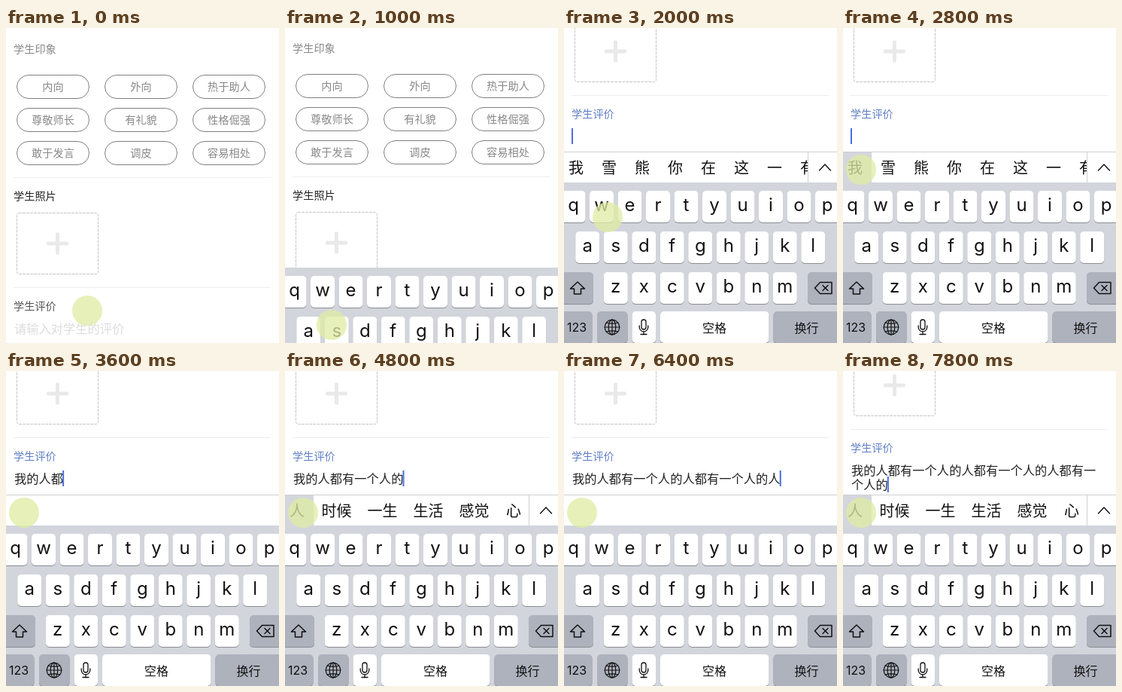
These frames come from a looping animation (363x418 px, 8000 ms). An HTML page with a canvas:

```html
<!DOCTYPE html>
<html lang="zh-CN">
<head>
<meta charset="utf-8">
<style>
html, body { margin: 0; width: 100%; height: 100%; overflow: hidden; background: #fff; }
canvas { display: block; width: 363px; height: 418px; }
</style>
</head>
<body>
<canvas id="stage"></canvas>
<script>
const W = 363, H = 418, LOOP = 8000, STEP = 200;
const canvas = document.getElementById('stage');
const ctx = canvas.getContext('2d');
const dpr = window.devicePixelRatio || 1;
canvas.width = W * dpr;
canvas.height = H * dpr;

const CJK = '"Noto Sans CJK SC", "Noto Sans CJK", sans-serif';
const LATIN = 'Inter, Roboto, sans-serif';
const BLUE = '#4a6ee0';

// Typing rhythm: one candidate is picked every TAP ms
const TAP = 2800 / 13, TAP_START = 3600 - 4.15 * TAP;
const PHRASE = '人都有一个人的', PER_LINE = 20, CHAR = 16.28;
const charAt = i => i < 2 ? '我的'[i] : PHRASE[(i - 2) % 7];

const NEXT = {
  '': '雪 熊 你 在 这 一 有',
  '我': '们 是 在 不 也 想 有',
  '的': '时候 一生 生活 感觉 心',
  '人': '是 生 在 们 不 和 有',
  '都': '是 在 不 会 没有 要 很',
  '有': '人 点 什么 时候 没有',
  '一': '次 天 样 直 些 下 种',
  '个': '月 小时 人的 世界 好'
};

const TAGS = ['内向', '外向', '热于助人', '尊敬师长', '有礼貌', '性格倔强', '敢于发言', '调皮', '容易相处'];

// Touch marker path: time, x, y
const TOUCH = [
  [0, 108, 375], [600, 62, 394], [1000, 62, 394], [2000, 58, 251],
  [2200, 54, 263], [2600, 24, 188]
];

const ease = p => { p = Math.min(1, Math.max(0, p)); return p * p * (3 - 2 * p); };
const ramp = (t, a, b) => ease((t - a) / (b - a));

function touchAt(t) {
  let i = 0;
  while (i < TOUCH.length - 2 && t > TOUCH[i + 1][0]) i++;
  const [ta, xa, ya] = TOUCH[i], [tb, xb, yb] = TOUCH[i + 1];
  const p = ramp(t, ta, tb);
  return [xa + (xb - xa) * p, ya + (yb - ya) * p];
}

function rect(x, y, w, h, color) {
  ctx.fillStyle = color;
  ctx.fillRect(x, y, w, h);
}

function box(x, y, w, h, r) {
  ctx.beginPath();
  ctx.roundRect(x, y, w, h, r);
}

// y is the visual middle of the CJK glyphs
function text(s, x, y, size, color, align = 'left') {
  ctx.font = `${size}px ${CJK}`;
  ctx.fillStyle = color;
  ctx.textAlign = align;
  ctx.fillText(s, x, y + size * 0.38);
}

function line(points, width = 1.4, color = '#111', close = false) {
  ctx.beginPath();
  points.forEach(([x, y]) => ctx.lineTo(x, y));
  if (close) ctx.closePath();
  ctx.lineWidth = width;
  ctx.strokeStyle = color;
  ctx.stroke();
}

function drawPage(t, count) {
  const focused = t >= 1000;
  const scroll = Math.round(255 * ramp(t, 985, 1400)) + (count > 0 ? 1 : 0)
    + Math.round(11 * ramp(t, 7230, 7560));
  ctx.save();
  ctx.translate(0, -scroll);

  text('学生印象', 10, 28, 14.2, '#888');
  TAGS.forEach((tag, i) => {
    const x = 14 + i % 3 * 117, y = 62 + Math.floor(i / 3) * 44;
    box(x + .5, y + .5, 96, 31, 15.5);
    ctx.lineWidth = 1;
    ctx.strokeStyle = '#808080';
    ctx.stroke();
    text(tag, x + 48.5, y + 16, 14.2, '#888', 'center');
  });
  rect(10, 198, 342, 1, '#ededed');

  text('学生照片', 10, 223, 14.2, '#222');
  box(14.5, 245.5, 108, 81, 3);
  ctx.setLineDash([3, 2]);
  ctx.lineWidth = 1;
  ctx.strokeStyle = '#c4c4c4';
  ctx.stroke();
  ctx.setLineDash([]);
  ctx.fillStyle = '#e9e9e9';
  box(54, 283.5, 29, 5, 1.5);
  ctx.fill();
  box(66, 271.5, 5, 29, 1.5);
  ctx.fill();
  rect(10, 344, 342, 1, '#ededed');

  text('学生评价', 10, 369, 14.2, focused ? '#5f7fc4' : '#555');
  if (!focused) {
    text('请输入对学生的评价', 11, 399, CHAR, '#dcdcdc');
  } else {
    let s = '';
    for (let i = 0; i < count; i++) s += charAt(i);
    text(s.slice(0, PER_LINE), 11, 399, CHAR, '#222');
    text(s.slice(PER_LINE), 11, 418, CHAR, '#222');
    const row = count > PER_LINE ? 1 : 0;
    rect(10 + (count - row * PER_LINE) * CHAR, 388 + row * 19, 2, 21, BLUE);
  }
  ctx.restore();
}

function drawBar(count, blank, pressed) {
  rect(0, 164, W, 41, '#fff');
  rect(0, 164, W, 1, '#cfd0d3');
  if (blank) return;
  if (pressed) rect(0, 165, 38, 40, '#d3d6dd');
  ctx.save();
  ctx.beginPath();
  ctx.rect(0, 165, 324, 40);
  ctx.clip();
  const first = charAt(count);
  const rest = NEXT[count ? charAt(count - 1) : ''].split(' ').filter(w => w !== first);
  let x = -6;
  for (const word of [first, ...rest]) {
    const w = word.length > 1 ? 61 : 44;
    text(word, x + w / 2, 185, 20, '#111', 'center');
    x += w;
  }
  ctx.restore();
  rect(324, 165, 1, 40, '#cfd0d3');
  line([[339.5, 189], [347, 181], [354.5, 189]], 1.4);
}

function key(x, y, w, color = '#fff') {
  ctx.fillStyle = '#8b8d92';
  box(x, y + 1, w, 42, 5);
  ctx.fill();
  ctx.fillStyle = color;
  box(x, y, w, 42, 5);
  ctx.fill();
}

function letters(row, cx, y) {
  [...row].forEach((c, i) => {
    const x = cx + i * 37.5;
    key(x - 16, y, 32);
    ctx.font = `24px ${LATIN}`;
    ctx.fillStyle = '#111';
    ctx.textAlign = 'center';
    ctx.fillText(c, x, y + 27);
  });
}

function drawGlobe(x, y) {
  ctx.lineWidth = 1.2;
  ctx.strokeStyle = '#111';
  for (const rx of [9.8, 4.8]) {
    ctx.beginPath();
    ctx.ellipse(x, y, rx, 9.8, 0, 0, 7);
    ctx.stroke();
  }
  line([[x - 9.8, y], [x + 9.8, y]], 1.2);
  line([[x, y - 9.8], [x, y + 9.8]], 1.2);
  for (const s of [-1, 1]) {
    ctx.beginPath();
    ctx.moveTo(x - 8, y + s * 6);
    ctx.quadraticCurveTo(x, y + s * 3.6, x + 8, y + s * 6);
    ctx.stroke();
  }
}

function drawMic(x, y) {
  ctx.lineWidth = 1.3;
  ctx.strokeStyle = '#111';
  box(x - 3, y - 10, 6, 13, 3);
  ctx.stroke();
  ctx.beginPath();
  ctx.moveTo(x - 5.8, y - 2);
  ctx.lineTo(x - 5.8, y);
  ctx.arc(x, y, 5.8, Math.PI, 0, true);
  ctx.lineTo(x + 5.8, y - 2);
  ctx.stroke();
  line([[x, y + 6], [x, y + 9.5]], 1.3);
  line([[x - 4, y + 9.5], [x + 4, y + 9.5]], 1.3);
}

function drawKeys(top) {
  const GREY = '#adb2bd';
  ctx.save();
  ctx.translate(0, top - 205);
  rect(0, 205, W, 220, '#d2d5dc');
  letters('qwertyuiop', 12.5, 216);
  letters('asdfghjkl', 31.25, 270);
  letters('zxcvbnm', 68.75, 324);

  key(-10, 324, 49, GREY);
  line([[18, 337], [27.5, 346], [22.5, 346], [22.5, 353], [13.5, 353], [13.5, 346], [8.5, 346]], 1.5, '#111', true);
  key(324, 324, 50, GREY);
  line([[333.5, 345], [340.5, 337.5], [356, 337.5], [356, 352.5], [340.5, 352.5]], 1.5, '#111', true);
  line([[344, 341.5], [351, 348.5]], 1.5);
  line([[351, 341.5], [344, 348.5]], 1.5);

  key(-10, 376, 47.5, GREY);
  key(44, 376, 40.5, GREY);
  key(90.5, 376, 31.5);
  key(128, 376, 144.5);
  key(278.5, 376, 95, GREY);
  ctx.font = `16px ${LATIN}`;
  ctx.fillStyle = '#111';
  ctx.textAlign = 'center';
  ctx.fillText('123', 17, 403);
  drawGlobe(64, 397);
  drawMic(106, 397);
  text('空格', 200, 398, 16, '#111', 'center');
  text('换行', 322.5, 398, 16, '#111', 'center');
  ctx.restore();
}

function draw(t) {
  const taps = (t - TAP_START) / TAP;
  const count = Math.max(0, Math.floor(taps));
  const phase = taps - Math.floor(taps);

  ctx.setTransform(dpr, 0, 0, dpr, 0, 0);
  ctx.lineJoin = ctx.lineCap = 'round';
  rect(0, 0, W, H, '#fff');
  drawPage(t, count);

  const top = Math.round(418 - 213 * ramp(t, 880, 1130));
  if (t > 1130) drawBar(count, count > 0 && phase < .3, taps > 0 && phase > .4);
  if (top < H) drawKeys(top);

  const [x, y] = touchAt(t);
  ctx.fillStyle = 'rgba(224, 235, 164, .76)';
  ctx.beginPath();
  ctx.arc(x, y, 20, 0, 7);
  ctx.fill();
}

const start = performance.now();
function tick() {
  const t = (performance.now() - start) % LOOP;
  draw(Math.floor(t / STEP) * STEP);
  requestAnimationFrame(tick);
}
tick();
</script>
</body>
</html>
```
